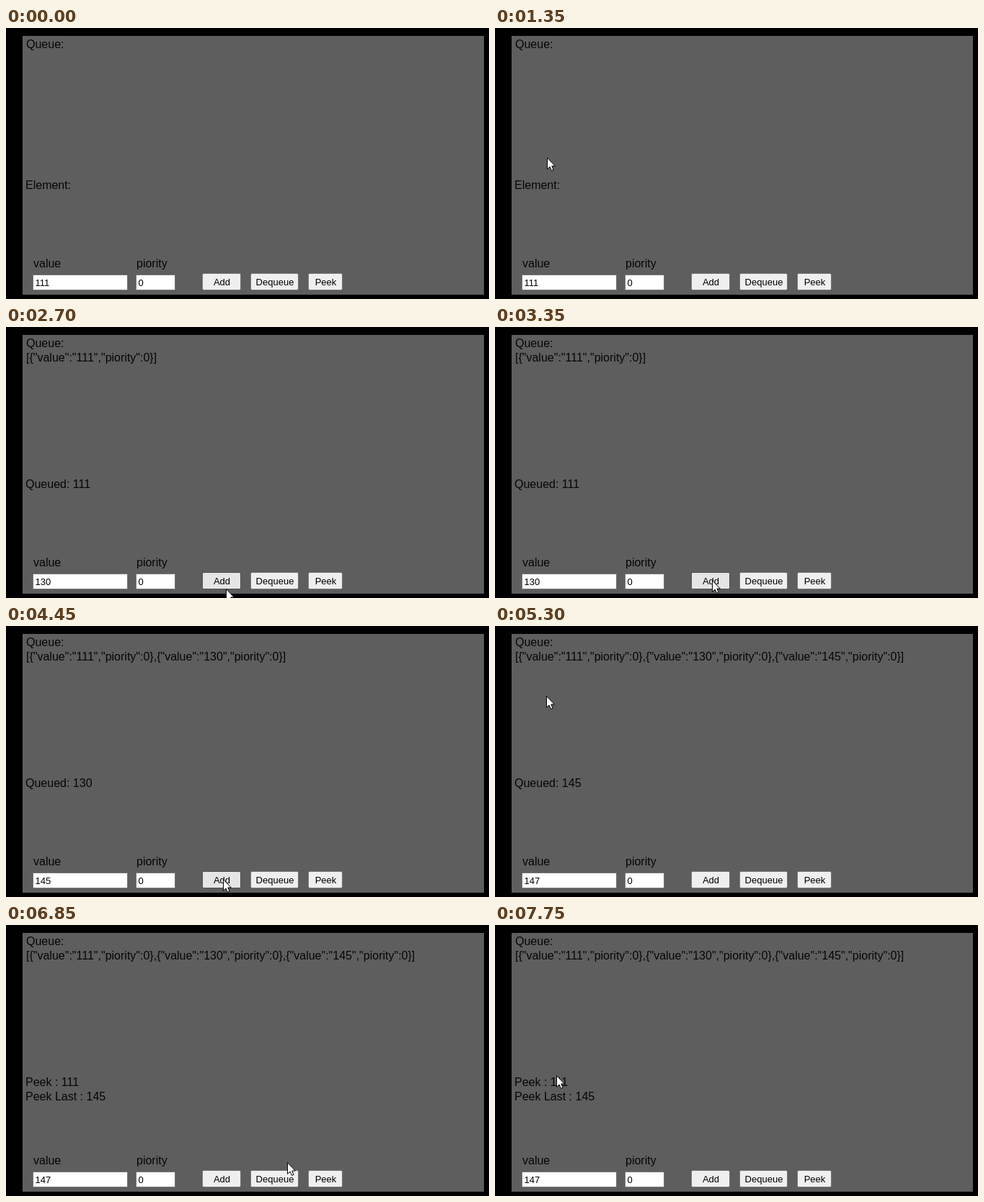
These frames come from a looping animation (670 by 377 pixels, 8 s). An HTML page:

```html
<!DOCTYPE html>
<html lang="en">
<head>
<meta charset="utf-8">
<title>Priority queue demo</title>
<style>
  html, body { margin: 0; width: 100%; height: 100%; overflow: hidden; background: #000; }
  svg { display: block; width: 100vw; height: 100vh; }
  text { font-family: "Liberation Sans", Arial, sans-serif; font-size: 16px; fill: #060606; white-space: pre; }
  .control text { font-size: 13px; fill: #000; }
  .button text { text-anchor: middle; }
  .input rect { fill: #fff; stroke: #767676; }
  .button rect { fill: #efefef; stroke: #767676; }
  .button.hover rect { fill: #e5e5e5; stroke: #4f4f4f; }
  .button.down rect { fill: #f5f5f5; stroke: #8d8d8d; }
</style>
</head>
<body>
<svg id="stage" viewBox="0 0 670 377">
  <rect width="670" height="377"/>
  <rect x="23" y="11" width="640" height="360" fill="#5e5e5e"/>
</svg>
<script>
const LOOP = 8000, STEP = 50, ENTER = 1150;
const stage = document.getElementById('stage');

function add(parent, tag, attrs, content = '') {
  const el = document.createElementNS('http://www.w3.org/2000/svg', tag);
  for (const key in attrs) el.setAttribute(key, attrs[key]);
  el.textContent = content;
  parent.appendChild(el);
  return el;
}

const label = (x, y, content) => add(stage, 'text', { x, y }, content);

function input(x, w, value) {
  const g = add(stage, 'g', { class: 'control input' });
  add(g, 'rect', { x: x + .5, y: 343.5, width: w - 1, height: 21, rx: .5 });
  return add(g, 'text', { x: x + 3.5, y: 359 }, value);
}

function button(x, w, name) {
  const g = add(stage, 'g', { class: 'control button' });
  add(g, 'rect', { x: x + .5, y: 341.5, width: w - 1, height: 23, rx: 2 });
  add(g, 'text', { x: x + w / 2 + .5, y: 358 }, name);
  return { g, x, w };
}

label(28, 28, 'Queue:');
const queueText = label(28, 48, '');
const resultText = label(27, 224, '');
const lastText = label(27, 244, '');
label(38, 333, 'value');
label(181, 333, 'piority');
const valueText = input(37, 132, '111');
input(180, 55, '0');
const buttons = [button(272, 54, 'Add'), button(339, 67, 'Dequeue'), button(419, 48, 'Peek')];

const cursor = add(stage, 'path', {
  d: 'M.5 .7V16.4L4.1 13L6.5 18.4L9.1 17.3L6.8 12H11.4Z',
  fill: '#fff', stroke: '#000'
});

// Pointer moves, each starting where the last one ended
const entry = { x: 29, y: 147 };
const moves = [
  { from: 1150, to: 1950, x: 303, y: 355 },
  { from: 2050, to: 2300, x: 305, y: 360 },
  { from: 2650, to: 2750, x: 305, y: 368 },
  { from: 3000, to: 3350, x: 301, y: 352 },
  { from: 4950, to: 5300, x: 71, y: 97 },
  { from: 5300, to: 5850, x: 538, y: 61 },
  { from: 5850, to: 6200, x: 455, y: 332 },
  { from: 6250, to: 6400, x: 447, y: 352 },
  { from: 6700, to: 7300, x: 85, y: 209 }
];

const clicks = [
  { button: 0, down: 2150, up: 2250 },
  { button: 0, down: 3400, up: 3500 },
  { button: 0, down: 4600, up: 4650 },
  { button: 2, down: 6400, up: 6500 }
];
const values = ['111', '130', '145', '147'];

function ease(k) {
  k = Math.min(1, Math.max(0, k));
  return k * k * (3 - 2 * k);
}

function pointer(t) {
  let { x, y } = entry;
  for (const m of moves) {
    const k = ease((t - m.from) / (m.to - m.from));
    x += (m.x - x) * k;
    y += (m.y - y) * k;
  }
  return [Math.round(x), Math.round(y)];
}

function draw(time) {
  const t = Math.floor((time % LOOP) / STEP) * STEP;
  const [px, py] = pointer(t);
  cursor.setAttribute('visibility', t >= ENTER ? 'visible' : 'hidden');
  cursor.setAttribute('transform', `translate(${px} ${py})`);

  buttons.forEach(({ g, x, w }, i) => {
    const over = px >= x && px < x + w && py >= 341 && py < 365;
    const down = clicks.some(c => c.button === i && t >= c.down && t < c.up);
    g.setAttribute('class', 'control button' + (down ? ' down' : over ? ' hover' : ''));
  });

  const done = clicks.filter(c => t >= c.up);
  const items = values.slice(0, done.filter(c => c.button === 0).length);
  const peeked = done.some(c => c.button === 2);
  const last = items[items.length - 1];
  queueText.textContent = items.length
    ? JSON.stringify(items.map(value => ({ value, piority: 0 }))) : '';
  valueText.textContent = values[items.length];
  resultText.textContent = peeked ? 'Peek : ' + items[0]
    : last ? 'Queued: ' + last : 'Element:';
  lastText.textContent = peeked ? 'Peek Last : ' + last : '';
}

const start = performance.now();
function tick() {
  draw(performance.now() - start);
  requestAnimationFrame(tick);
}
tick();
</script>
</body>
</html>
```
